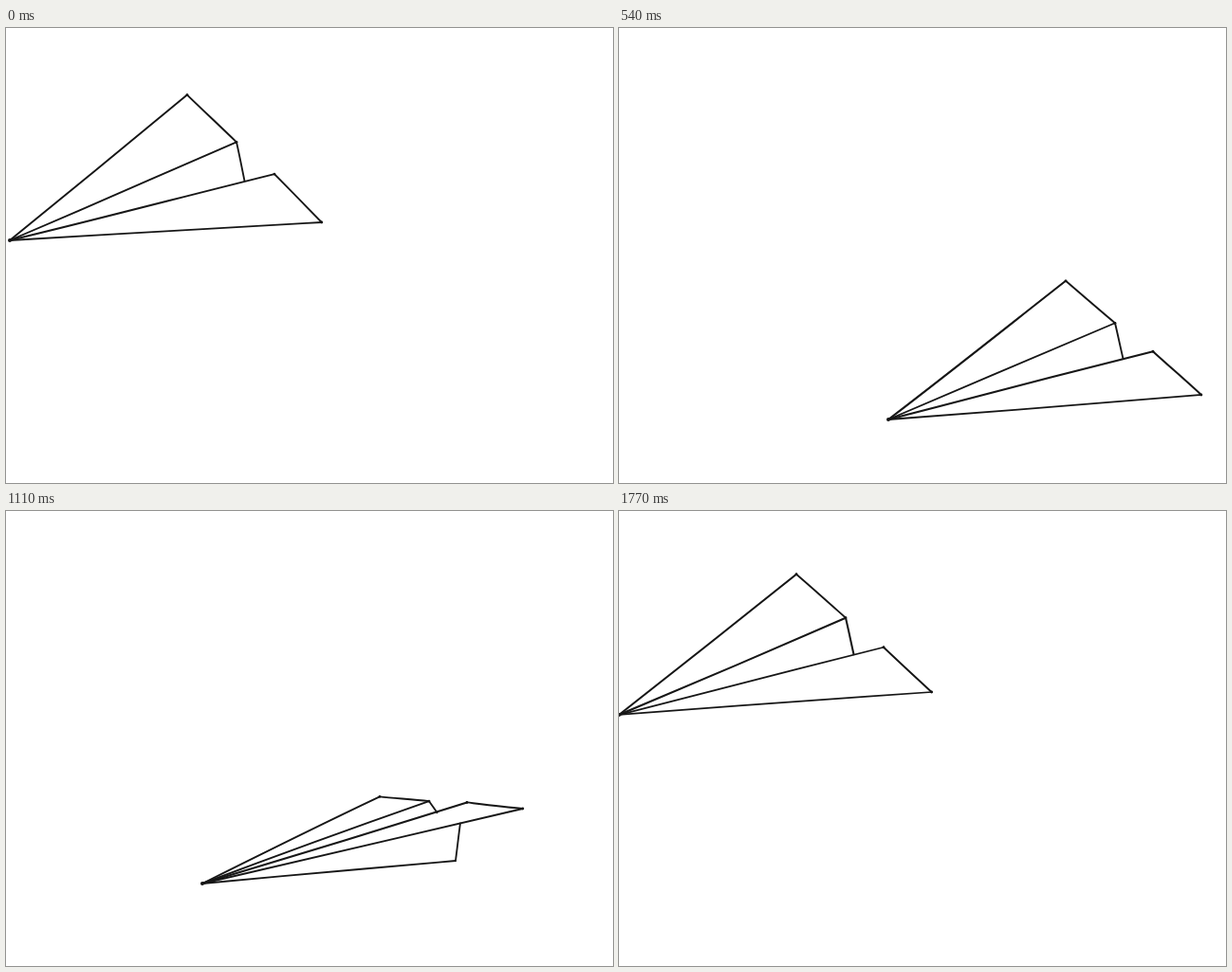
Write an HTML page with a canvas that moves like this. It is 640 px wide and 480 px high and loops after 1800 ms.

```html
<!DOCTYPE html>
<html lang="en">
<head>
<meta charset="utf-8">
<title>Paper plane</title>
<style>
  html, body { margin: 0; width: 100%; height: 100%; overflow: hidden; background: #fff; }
  canvas { display: block; width: 640px; height: 480px; }
</style>
</head>
<body>
<canvas id="stage" width="640" height="480"></canvas>
<script>
const ctx = document.getElementById('stage').getContext('2d');
const LOOP = 1800, STEP = 30;

// Flight path: time, nose position and pitch (height of the right tip above the nose)
const flight = [
  { t: 0,    x: 4,   y: 224, pitch: 19 },
  { t: 210,  x: 101, y: 328, pitch: 7 },
  { t: 540,  x: 284, y: 413, pitch: 26 },
  { t: 780,  x: 311, y: 407, pitch: 43 },
  { t: 1110, x: 207, y: 393, pitch: 79 },
  { t: 1530, x: 6,   y: 225, pitch: 59 },
  { t: 1680, x: -7,  y: 198, pitch: 35 },
  { t: 1770, x: 0,   y: 215, pitch: 24 }
];

function keyAt(i) {
  const turn = Math.floor(i / flight.length), key = flight[i - turn * flight.length];
  return { ...key, t: key.t + turn * LOOP };
}

// Smooth looping curve through the unevenly timed keys
function sample(t) {
  const i = flight.findLastIndex(key => key.t <= t);
  const [a, b, c, d] = [-1, 0, 1, 2].map(k => keyAt(i + k));
  const span = c.t - b.t, s = (t - b.t) / span, ease = s * s * (3 - 2 * s);
  const slope = (p, q, r, k) => {
    const h = q.t - p.t, g = r.t - q.t;
    return ((q[k] - p[k]) / h * g + (r[k] - q[k]) / g * h) / (h + g);
  };
  const value = k => b[k] + (c[k] - b[k]) * ease +
    s * (1 - s) * span * ((1 - s) * slope(a, b, c, k) - s * slope(b, c, d, k));
  return { x: value('x'), y: value('y'), pitch: value('pitch') };
}

const noise = n => {
  const r = Math.sin(n * 127.1 + 11.7) * 43758.5453;
  return (r - Math.floor(r)) * 2 - 1;
};

// Slightly shaky pen line of uneven weight
function penLine(p, q, seed) {
  const dx = q.x - p.x, dy = q.y - p.y, len = Math.hypot(dx, dy) || 1;
  const sway = Math.min(1, len / 150);
  const at = (f, o) => [p.x + dx * f - dy / len * o, p.y + dy * f + dx / len * o];
  ctx.lineWidth = 1.95 + noise(seed + 0.25) * 0.2;
  ctx.beginPath();
  ctx.moveTo(p.x, p.y);
  ctx.bezierCurveTo(...at(1 / 3, noise(seed) * sway), ...at(2 / 3, noise(seed + 0.5) * sway), q.x, q.y);
  ctx.stroke();
}

function dot(p, r) {
  ctx.beginPath();
  ctx.arc(p.x, p.y, r, 0, Math.PI * 2);
  ctx.fill();
}

// Every corner rises or sinks in proportion to the pitch
function draw(step) {
  const { x, y, pitch } = sample(step * STEP);
  const corner = (dx, rise, gain = 0) => ({ x: x + dx, y: y - rise - gain * pitch });
  const nose = corner(0, 0);
  const left = corner(187, 173, -1.03);
  const fold = corner(239, 109, -0.28);
  const foot = corner(247.5, 59, 0.2);
  const shoulder = corner(279, 65, 0.26);
  const right = corner(326 + 0.15 * pitch, 0, 1);
  const keel = corner(267, 24);
  const hinge = corner(0.805 * (right.x - x), 0, 0.805);

  const lines = [[nose, left], [left, fold], [fold, nose], [fold, foot],
                 [nose, shoulder], [shoulder, right], [right, nose]];
  // The wing hides the keel until the plane levels out
  if (keel.y > hinge.y + 1) lines.push([nose, keel], [keel, hinge]);

  ctx.fillStyle = '#fff';
  ctx.fillRect(0, 0, 640, 480);
  ctx.strokeStyle = ctx.fillStyle = '#161616';
  ctx.lineCap = ctx.lineJoin = 'round';
  lines.forEach(([p, q], k) => penLine(p, q, step * 10 + k));
  dot(nose, 2);
  [left, fold, shoulder, right].forEach(p => dot(p, 1.4));
}

let start = null, shown = -1;
function tick() {
  const now = performance.now();
  if (start === null) start = now;
  const step = Math.floor(((now - start) % LOOP) / STEP);
  if (step !== shown) draw(shown = step);
  requestAnimationFrame(tick);
}
tick();
</script>
</body>
</html>
```
